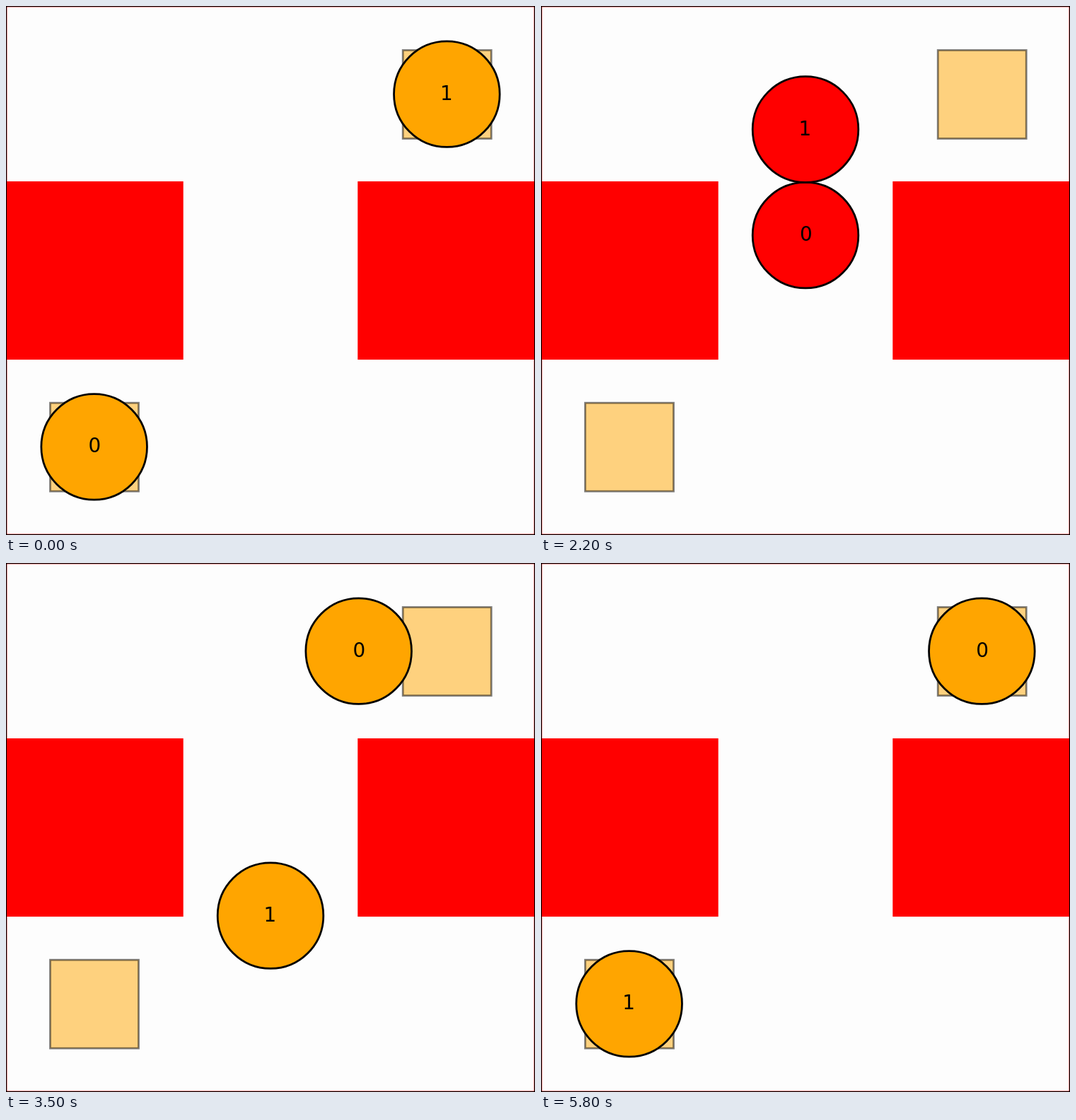
Recreate the animation shown at these times as an HTML page. Size 748x748 px, loop 6000 ms.

```html
<!DOCTYPE html>
<html>
<head>
<meta charset="utf-8">
<title>Two agents swapping places</title>
<style>
  html, body { margin: 0; width: 100%; height: 100%; overflow: hidden; background: #fdfdfd; }
  svg { display: block; width: 748px; height: 748px; stroke-width: 2.78; }
  .goal { fill: orange; stroke: #000; fill-opacity: .5; stroke-opacity: .5; }
  .wall { fill: red; stroke: red; }
  circle { stroke: #000; }
  text { font: 27.8px "DejaVu Sans", sans-serif; text-anchor: middle; }
</style>
</head>
<body>
<svg viewBox="0 0 748 748">
  <rect width="748" height="748" fill="none" stroke="red"/>
  <rect class="wall" y="249.33" width="249.33" height="249.33"/>
  <rect class="wall" x="498.67" y="249.33" width="249.33" height="249.33"/>
  <rect class="goal" x="62.5" y="561.2" width="125" height="125"/>
  <rect class="goal" x="561.2" y="62.5" width="125" height="125"/>
  <circle r="74.8"/>
  <circle r="74.8"/>
  <text dx=".8" dy="8">0</text>
  <text dx="-.6" dy="8">1</text>
  <rect width="748" height="748" fill="none" stroke="#000" stroke-width="2.2"/>
</svg>
<script>
const CELL = 748 / 3, STEP = 100, LOOP = 6000;
const circles = document.querySelectorAll('circle');
const labels = document.querySelectorAll('text');

// One [column, row] waypoint per second for each agent
const paths = [
  [[0, 2], [1, 2], [1, 1], [1, 0], [2, 0], [2, 0]],
  [[2, 0], [1, 0], [1, 0], [1, 1], [1, 2], [0, 2]]
];

function position(path, seconds) {
  const i = Math.min(Math.floor(seconds), path.length - 1);
  const from = path[i], to = path[i + 1] || from;
  return from.map((v, axis) => v + (to[axis] - v) * (seconds - i));
}

function draw(ms) {
  const seconds = Math.floor(ms % LOOP / STEP) * STEP / 1000;
  const [a, b] = paths.map(path => position(path, seconds));
  const tooClose = Math.hypot(a[0] - b[0], a[1] - b[1]) < 0.7;
  [a, b].forEach((p, i) => {
    const [x, y] = p.map(v => (v + 0.5) * CELL);
    circles[i].setAttribute('cx', x);
    circles[i].setAttribute('cy', y);
    circles[i].setAttribute('fill', tooClose ? 'red' : 'orange');
    labels[i].setAttribute('x', x);
    labels[i].setAttribute('y', y);
  });
}

const start = performance.now();
function tick() {
  draw(performance.now() - start);
  requestAnimationFrame(tick);
}
tick();
</script>
</body>
</html>
```
